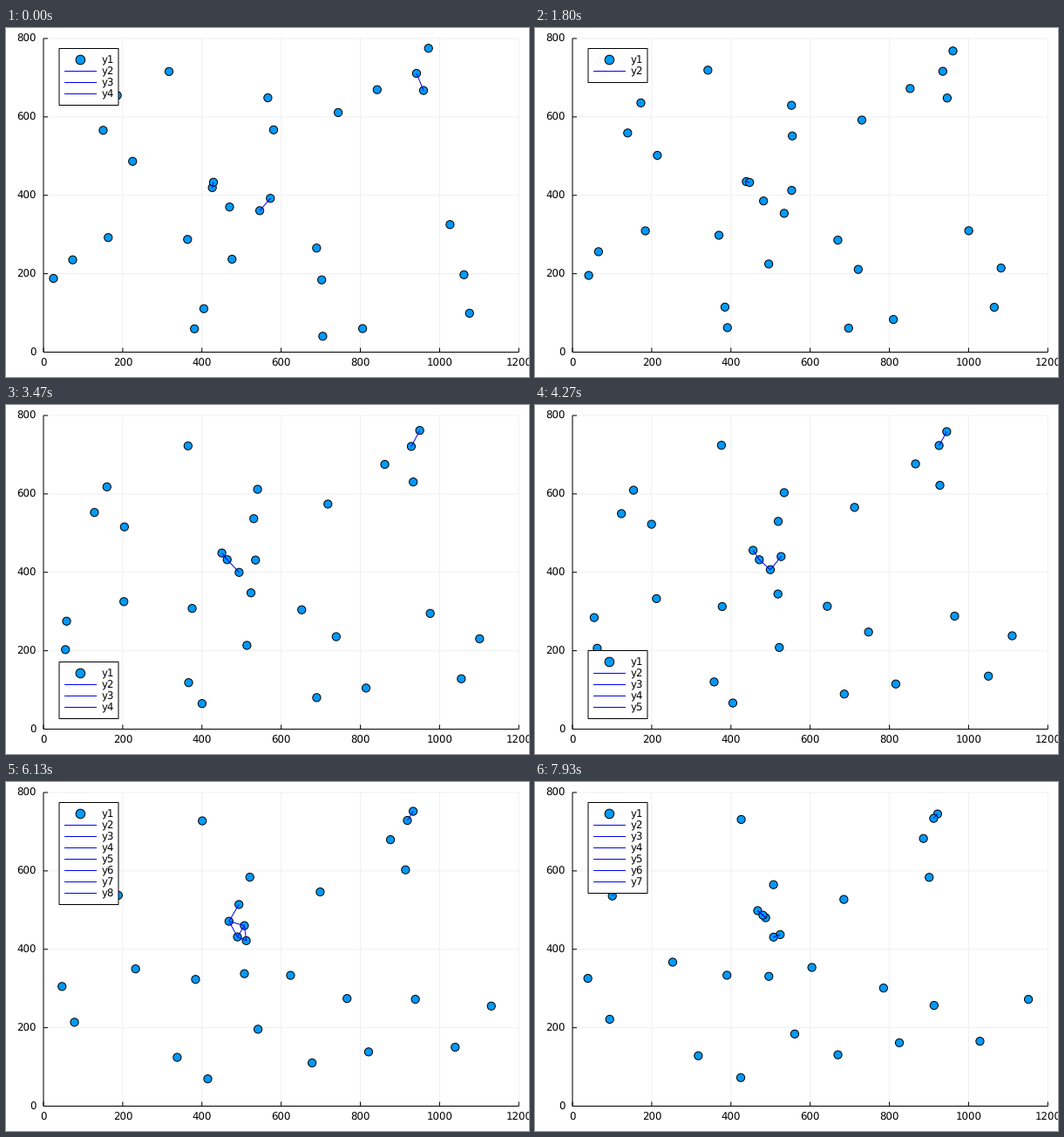
Write a matplotlib script that moves like this. It is 600 by 400 pixels and loops after 8 s.

```python
from itertools import combinations

import numpy as np
import matplotlib.pyplot as plt
from matplotlib.animation import FuncAnimation
from matplotlib.patches import Circle, Rectangle

W, H, DPI = 600, 400, 100
FRAMES, LOOP = 120, 8000
PX = 72 / DPI                              # one pixel in points
LEFT, RIGHT, TOP, BOTTOM = 43, 588.3, 12, 371.5
SIZE = np.array([RIGHT - LEFT, BOTTOM - TOP])
SCALE = SIZE / (1200, 800)                 # pixels per data unit
REACH = 50                                 # linking distance in data units
ROW = 13                                   # legend row height
SLOTS = 14

# Dots in a flock share one drift per loop; each is given by its midway point.
FLOCKS = {
    (-52, 31): [(281, 132.2), (483.4, 240.8)],
    (-27, 38): [(114.1, 96.2), (286.9, 99), (367.6, 115.9), (465.5, 90.6)],
    (-23, 13.5): [(100, 124), (279.6, 216.1), (473.2, 30)],
    (-13.7, -10.4): [(464.1, 46.8)],
    (-39, -40): [(283.8, 175.2), (336.8, 232.2)],
    (-21.5, -30): [(134.5, 137.8), (521, 311.9)],
    (-16, -41): [(68.5, 245.2), (355.4, 332.8)],
    (-40, -8): [(207, 317.7)],
    (9, -46): [(413.6, 321.5)],
    (12, -21): [(214.3, 231.8)],
    (20, -6): [(226.2, 341.8), (435.8, 67.7)],
    (25, -30.5): [(249.2, 167.7), (269, 189.9)],
    (31.5, -15.2): [(70.2, 279.4)],
    (36, 1): [(256, 177.3)],
    (38, -53): [(381.2, 262.2)],
    (41, -34): [(137.8, 223.2), (545.9, 265.8)],
    (39, 24): [(278.8, 277)],
    (50, -7): [(212, 46.4)],
}
DRIFT = np.array([d for d, dots in FLOCKS.items() for _ in dots])
MIDWAY = np.array([p for dots in FLOCKS.values() for p in dots])
PAIRS = list(combinations(range(len(MIDWAY)), 2))

plt.rcParams["font.family"] = "DejaVu Sans"
plt.rcParams["text.hinting"] = "none"
fig = plt.figure(figsize=(W / DPI, H / DPI), dpi=DPI, facecolor="white")
ax = fig.add_axes([0, 0, 1, 1])
ax.set_xlim(0, W)
ax.set_ylim(H, 0)
ax.axis("off")


def stroke(x, y, color="black", z=2):
    return ax.plot(x, y, color=color, lw=PX, zorder=z, snap=False,
                   solid_capstyle="butt")[0]


def label(x, mid, text, align, z=2):
    return ax.text(x, mid + 4.3, text, fontsize=11.8 * PX, ha=align,
                   va="baseline", zorder=z)


def dot(radius, z):
    return ax.add_patch(Circle((0, 0), radius, fc="#009afa", ec="black",
                               lw=PX, zorder=z))


def draw_axes():
    for x in np.linspace(LEFT, RIGHT, 7):
        stroke([x, x], [TOP, BOTTOM], "#f0f0f0", 1)
        stroke([x, x], [BOTTOM, BOTTOM - 5])
        label(x, 383.2, f"{(x - LEFT) / SCALE[0]:.0f}", "center")
    for y in np.linspace(BOTTOM, TOP, 5):
        stroke([LEFT, RIGHT], [y, y], "#f0f0f0", 1)
        stroke([LEFT, LEFT + 5], [y, y])
        label(35, y, f"{(BOTTOM - y) / SCALE[1]:.0f}", "right")
    stroke([LEFT, LEFT], [TOP, BOTTOM])
    stroke([LEFT, RIGHT], [BOTTOM, BOTTOM])


draw_axes()
dots = [dot(4.6, 3) for _ in MIDWAY]
links = [stroke([], [], "blue", 4) for _ in range(SLOTS)]
box = ax.add_patch(Rectangle((61, 23.5), 68, 39, fc="white", ec="black",
                             lw=PX, zorder=6, snap=False))
key_dot = dot(5.3, 7)
key_lines = [stroke([], [], "blue", 7) for _ in range(SLOTS)]
key_names = [label(109.3, 0, f"y{i + 1}", "left", 7) for i in range(SLOTS + 1)]


def crowding(pos, corner):
    """How strongly the dots near a corner of the plot crowd it."""
    gap = np.abs(pos - corner) / SIZE
    near = gap[(gap <= 0.25).all(axis=1)]
    return np.sum(1 / (1 + 100 * np.sum(near ** 2, axis=1)))


def place_legend(pos, count):
    height = (count + 2) * ROW
    low = crowding(pos, (LEFT, BOTTOM)) < crowding(pos, (LEFT, TOP))
    top = 359.5 - height if low else 23.5
    box.set_y(top)
    box.set_height(height)
    box.set_width(68 if count < 9 else 75.5)
    key_dot.set_center((85.4, top + ROW))
    for i, name in enumerate(key_names):
        name.set_y(top + (i + 1) * ROW + 4.3)
        name.set_visible(i <= count)
    for i, line in enumerate(key_lines):
        y = top + (i + 2) * ROW
        line.set_data([67, 104], [y, y])
        line.set_visible(i < count)


def draw(frame):
    pos = MIDWAY + DRIFT * (frame / (FRAMES - 1) - 0.5)
    data = pos / SCALE
    near = [p for p in PAIRS
            if np.hypot(*(data[p[0]] - data[p[1]])) < REACH][:SLOTS]
    for circle, p in zip(dots, pos):
        circle.set_center(p)
    for i, line in enumerate(links):
        line.set_visible(i < len(near))
        if i < len(near):
            line.set_data(*pos[list(near[i])].T)
    place_legend(pos, len(near))
    return []


anim = FuncAnimation(fig, draw, frames=FRAMES, interval=LOOP / FRAMES,
                     repeat=True, repeat_delay=0)
plt.show()
```
